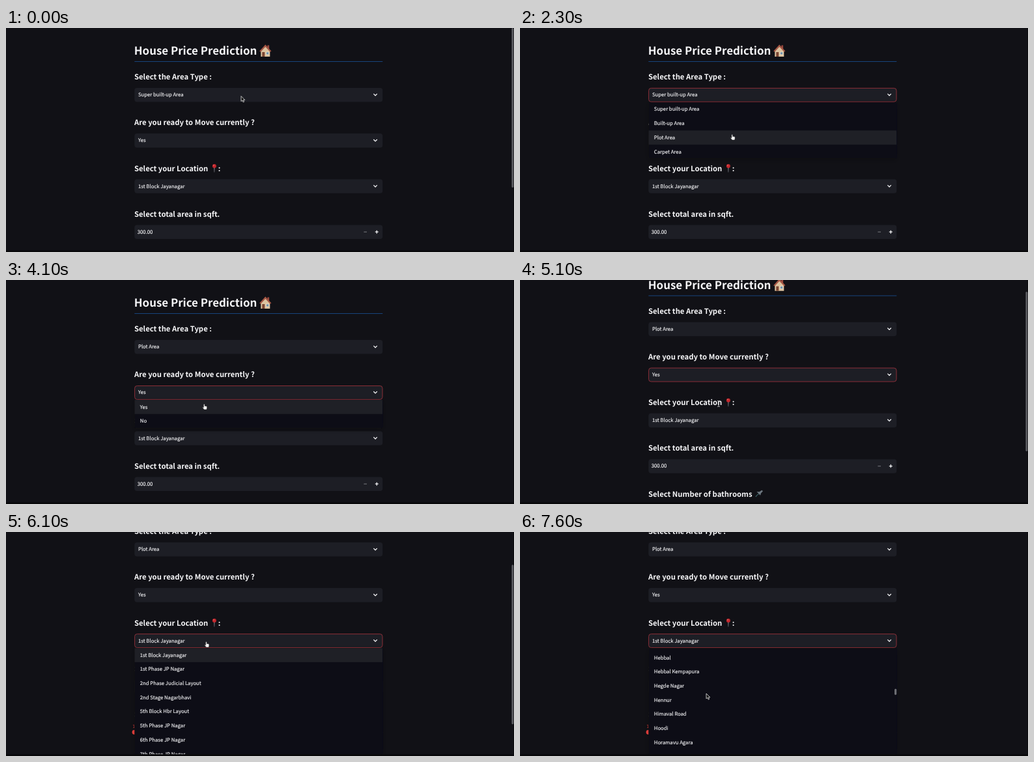
Recreate the animation shown at these times as an HTML page. Size 780 by 344 pixels, loop 8000 ms.

```html
<!DOCTYPE html>
<html lang="en">
<head>
<meta charset="utf-8">
<title>House Price Prediction</title>
<style>
  html, body { margin: 0; width: 100%; height: 100%; overflow: hidden; background: #111116; }
  svg { display: block; width: 780px; height: 344px; }
  text {
    font: 400 7.73px "Noto Sans CJK JP", "Noto Sans CJK SC", "Noto Sans CJK", sans-serif;
    fill: #f6f6f8; white-space: pre; text-rendering: geometricPrecision;
  }
  .item { stroke: #f6f6f8; stroke-width: .14px; }
  .h2 { font-weight: 700; font-size: 16.9px; }
  .h4 { font-weight: 700; font-size: 11.3px; }
  .tick { font-family: "Noto Sans Mono", monospace; font-size: 7.3px; }
</style>
</head>
<body>
<svg id="stage" viewBox="0 0 780 344">
  <defs>
    <filter id="shade" x="-10%" y="-30%" width="120%" height="170%">
      <feDropShadow dx="0" dy="2" stdDeviation="4" flood-color="#000" flood-opacity=".25"/>
    </filter>
  </defs>
  <rect width="780" height="344" fill="#111116"/>
  <g id="page">
    <text class="h2" x="196.8" y="41.4">House Price Prediction</text>
    <g id="house">
      <rect x="401.3" y="26.5" width="2.8" height="6" fill="#95463c"/>
      <path d="M391.3 34L398.3 27L405.3 34V44H391.3Z" fill="#dcc3a0"/>
      <path d="M389.2 35.6L398.3 25.4L407.4 35.6L405.6 36.8L398.3 29L391 36.8Z" fill="#a45644"/>
      <rect x="393.3" y="37" width="4" height="7" fill="#7c4633"/>
      <rect x="399.6" y="37" width="4" height="3.8" fill="#6e93ac" stroke="#f2e6d2" stroke-width=".6"/>
    </g>
    <rect x="197.3" y="51" width="381" height="1" fill="#17437c"/>
    <g id="fields"></g>
    <g id="pin">
      <path d="M319.3 214h1.2l-.3 7.6h-.6Z" fill="#85878f"/>
      <circle cx="319.9" cy="212" r="3" fill="#c4262c"/>
      <circle cx="319" cy="210.9" r=".8" fill="#e0736e"/>
    </g>
    <g id="shower">
      <path d="M362 360l5-5" stroke="#4e8a8e" stroke-width="1.2" stroke-dasharray="1.2 .8"/>
      <path d="M363.5 352.5L369 358L370 354.8L373 351.5L371.3 350L367.6 352.6Z" fill="#6d7780"/>
    </g>
    <g id="slider">
      <rect x="197.3" y="382.5" width="381" height="2" rx="1" fill="#2b2c34"/>
      <circle cx="197" cy="383.5" r="3.4" fill="#f0413f"/>
      <text class="tick" x="194" y="377.4" style="fill:#d83a3c">1</text>
      <text class="tick" x="197.2" y="398.6">1</text>
      <text class="tick" x="569.4" y="398.6">16</text>
    </g>
    <g id="menus"></g>
  </g>
  <rect x="779" width="1" height="344" fill="#08080a"/>
  <rect id="bar" x="776.4" width="3" height="245" rx="1.5" fill="#5a5b60"/>
  <rect y="341.5" width="780" height="2.5" fill="#08080a"/>
  <g id="cursor">
    <path d="M0 0V8L1.9 6.4L3.2 9.3L4.6 8.7L3.3 5.9H5.8Z" fill="#111" stroke="#e8e8e8" stroke-width=".8"/>
    <path d="M.4 1.1q.9-1.4 1.7 0V3.4q2.4 0 3.5 .9V7L5 9H1.2L-1.3 5.8q0-1.2 1.7 0Z" fill="#f4f4f4" stroke="#222" stroke-width=".5"/>
    <path d="M-1.8-4.6Q0-4.6 0-3.4Q0-4.6 1.8-4.6M0-3.4V3.4M-1.8 4.6Q0 4.6 0 3.4Q0 4.6 1.8 4.6M-1 .9H1" fill="none" stroke="#d0d0d2" stroke-width=".9"/>
  </g>
</svg>
<script>
const LOOP = 8000, STEP = 100, ROW = 21.7, LIST_START = 6820, LEFT = 197.3, WIDTH = 381;
const $ = id => document.getElementById(id);

function add(parent, tag, attrs, text) {
  const el = document.createElementNS("http://www.w3.org/2000/svg", tag);
  for (const k in attrs) el.setAttribute(k, attrs[k]);
  if (text) el.textContent = text;
  parent.append(el);
  return el;
}
const show = (el, on) => el.setAttribute("visibility", on ? "inherit" : "hidden");

// Place list: first and last stretches by name, the middle from stems and endings
const first = ["1st Block Jayanagar", "1st Phase JP Nagar", "2nd Phase Judicial Layout",
  "2nd Stage Nagarbhavi", "5th Block Hbr Layout",
  ...[5, 6, 7, 8, 9].map(n => n + "th Phase JP Nagar"),
  "AECS Layout", "Abbigere", "Akshaya Nagar", "Ambalipura", "Ambedkar Nagar", "Amruthahalli",
  "Anandapura", "Ananth Nagar", "Anekal", "Anjanapura", "Ardendale", "Arekere"];
const stems = ["Bel", "Bom", "Chan", "Chik", "Das", "Dod", "Gol", "Gub", "Gun"];
const ends = ["agere", "ahalli", "anapura", "asandra", "avara", "enahalli", "igere", "upalya"];
const last = ["Hebbal", "Hebbal Kempapura", "Hegde Nagar", "Hennur", "Himaval Road", "Hoodi",
  "Horamavu Agara", "Hormavu", "Hosa Nagar"];
const places = [...first, ...stems.flatMap(s => ends.map(e => s + e)), ...last];

// Each menu: its field's top, options, opening and closing times
const menus = [
  { y: 92, open: 600, close: 2500, items: ["Super built-up Area", "Built-up Area", "Plot Area", "Carpet Area"] },
  { y: 162.1, open: 3300, close: 4500, items: ["Yes", "No"] },
  { y: 232.2, open: 6000, close: LOOP, items: places }
];

const fields = $("fields");
["Select the Area Type :", "Are you ready to Move currently ?", "Select your Location",
 "Select total area in sqft.", "Select Number of bathrooms"].forEach((s, i) =>
  add(fields, "text", { class: "h4", x: 197, y: 79.3 + 70.15 * i }, s));
add(fields, "text", { class: "h4", x: 325.7, y: 219.6 }, ":");

const box = y => add(fields, "rect", { x: LEFT, y, width: WIDTH, height: 21.6, rx: 4, fill: "#1d1e25" });

menus.forEach((m, i) => {
  m.top = m.y + 22;
  m.height = Math.min(m.items.length * ROW, 163.4);
  box(m.y);
  m.ring = add(fields, "rect", { x: LEFT + .3, y: m.y + .4, width: WIDTH - .6, height: 20.9, rx: 3.8,
    fill: "none", stroke: "#962f39", "stroke-width": .9 });
  m.value = add(fields, "text", { class: "item", x: 203, y: m.y + 13.3 }, m.items[0]);
  add(fields, "path", { d: `M564.7 ${m.y + 9.4}l2.4 2.4l2.4-2.4`, fill: "none",
    stroke: "#f4f4f6", "stroke-width": 1.3, "stroke-linecap": "round" });

  m.el = add($("menus"), "g");
  const area = { x: LEFT, y: m.top, width: WIDTH, height: m.height };
  add(add(m.el, "clipPath", { id: "clip" + i }), "rect", area);
  add(m.el, "rect", { ...area, rx: 2, fill: "#101014", filter: "url(#shade)" });
  m.list = add(add(m.el, "g", { "clip-path": `url(#clip${i})` }), "g");
  m.rows = m.items.map((s, n) => {
    const y = m.top + ROW * n;
    const glow = add(m.list, "rect", { x: LEFT, y, width: WIDTH, height: ROW, fill: "#1f2026" });
    add(m.list, "text", { class: "item", x: 205.8, y: y + 13.4 }, s);
    return glow;
  });
});
const thumb = add(menus[2].el, "rect", { x: 575, width: 3.2, height: 9.5, rx: 1.6, fill: "#6c6d72" });

box(302.5);
add(fields, "text", { class: "item", x: 201.8, y: 315.8 }, "300.00");
add(fields, "path", { d: "M549.4 313.2h4.6", stroke: "#73747a", "stroke-width": 1.1 });
add(fields, "path", { d: "M566.8 313.2h5M569.3 310.7v5", stroke: "#f4f4f6", "stroke-width": 1.3 });

// Pointer path: time, x, y, shape (0 arrow, 1 hand, 2 text bar)
const path = [
  [0, 361, 104.6, 0], [300, 363, 106, 0], [600, 364, 106, 1], [900, 372, 128, 1], [1150, 378, 163, 1],
  [1320, 376, 162, 1], [1460, 372, 131, 1], [1500, 371.5, 125, 1], [1700, 360, 140, 1],
  [1950, 331, 163, 1], [2100, 324.5, 163, 1], [2800, 324.5, 163, 1], [3200, 317, 173, 1],
  [3400, 316, 174, 1], [3650, 311, 188, 1], [4100, 303, 190, 1], [4500, 303, 191, 2],
  [5100, 305, 190, 2], [5300, 309.5, 182, 2], [5700, 307, 168, 1], [6200, 306, 168, 1],
  [6600, 288, 244, 1], [6700, 286, 248, 1], [6800, 286, 248, 0], [LOOP, 286, 248, 0]
];
function pointer(t) {
  const i = Math.max(0, path.findIndex(p => p[0] > t) - 1);
  const a = path[i], b = path[i + 1], u = Math.max(0, (t - a[0]) / (b[0] - a[0]));
  return { x: a[1] + (b[1] - a[1]) * u, y: a[2] + (b[2] - a[2]) * u, shape: a[3] };
}

const unit = (t, from, to) => Math.min(1, Math.max(0, (t - from) / (to - from)));
const pageScroll = t => 76 * (1 - (1 - unit(t, 5050, 5300)) ** 2);
const listScroll = t => t < 6900
  ? 308.7 * unit(t, LIST_START, 6900)
  : 308.7 + 1727 * (1 - (1 - unit(t, 6900, 7600)) ** 1.5);

function hovered(m, t) {
  if (t >= LIST_START) return -1;
  const n = Math.floor((pointer(t).y + pageScroll(t) - m.top) / ROW);
  return t < m.open || n < 0 ? 0 : n;
}

const LAGS = [80, 120, 160, 200, 240];
function draw(t) {
  const scroll = pageScroll(t), offset = listScroll(t);
  $("page").setAttribute("transform", `translate(0 ${-scroll})`);

  menus.forEach((m, i) => {
    const open = t >= m.open && t < m.close;
    const next = menus[i + 1];
    show(m.el, open);
    show(m.ring, t >= m.open && (!next || t < next.open));
    if (!open) return;
    const lit = t >= LIST_START ? [] : LAGS.map(d => hovered(m, t - d));
    m.rows.forEach((r, n) => r.setAttribute("opacity", lit.filter(v => v === n).length / LAGS.length));
  });
  menus[0].value.textContent = menus[0].items[t < menus[0].close ? 0 : 2];

  menus[2].list.setAttribute("transform", `translate(0 ${-offset})`);
  thumb.setAttribute("y", 253 + .0313 * offset);
  show(thumb, offset > 0 && t >= menus[2].open);

  $("bar").setAttribute("y", scroll * .66);
  show($("bar"), t < 600 || (t >= 2500 && t < 3900) || (t >= 4500 && t < 6400));

  const p = pointer(t);
  $("cursor").setAttribute("transform", `translate(${p.x} ${p.y})`);
  [...$("cursor").children].forEach((el, i) => show(el, i === p.shape));
}

const start = performance.now();
function tick() {
  const t = (performance.now() - start) % LOOP;
  draw(Math.floor(t / STEP) * STEP);
  requestAnimationFrame(tick);
}
tick();
</script>
</body>
</html>
```
